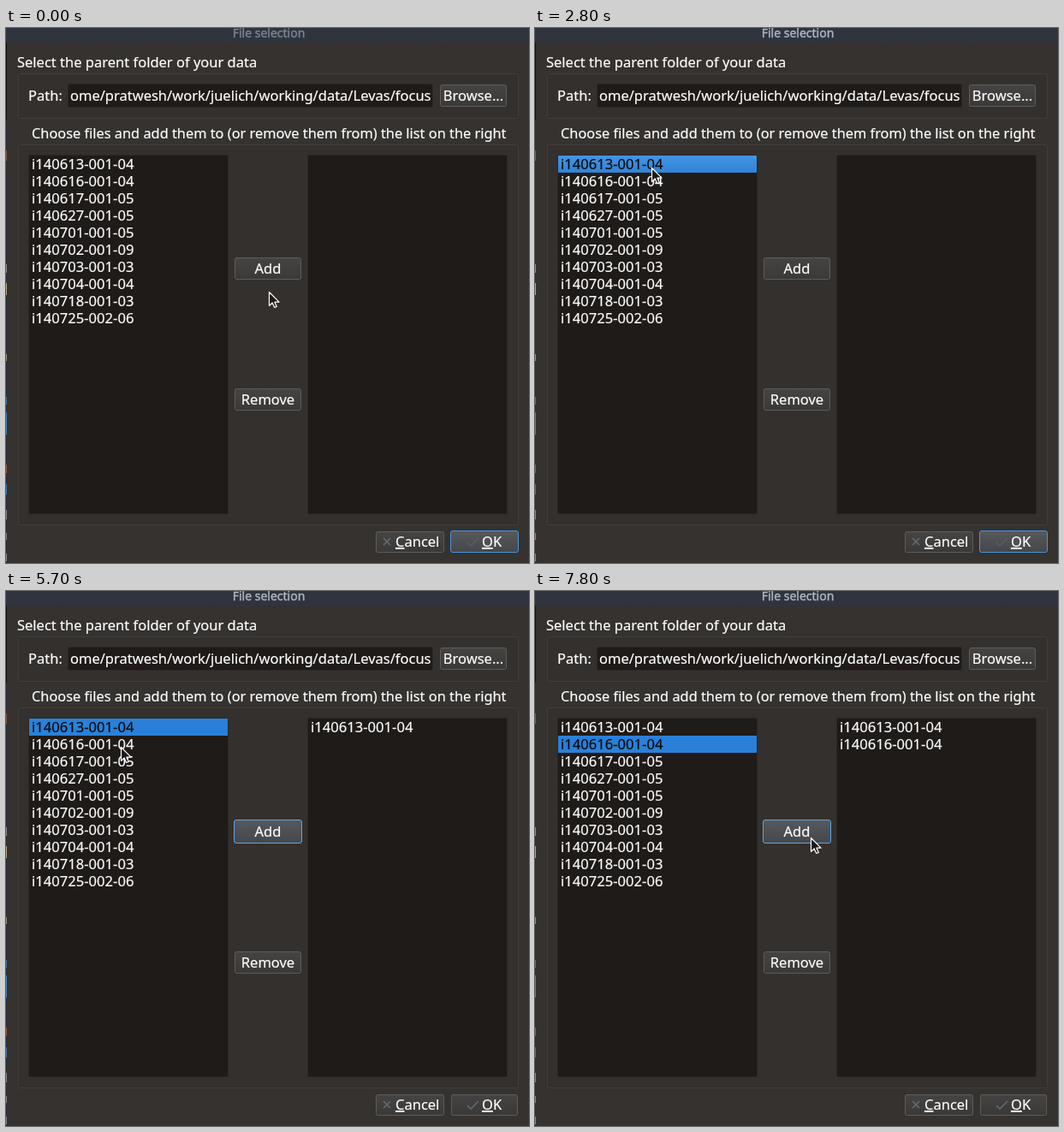
An HTML page for the animation above (8000 ms loop, 611x625 px).

```html
<!DOCTYPE html>
<html lang="en">
<head>
<meta charset="utf-8">
<title>File selection</title>
<style>
  html, body { margin: 0; width: 100%; height: 100%; overflow: hidden; background: #35322f; }
  svg { display: block; width: 100%; height: 100%; }
  text { font: 16.5px "Noto Sans", "Open Sans", sans-serif; fill: #fcfcfc; stroke: #fcfcfc; stroke-width: .2; white-space: pre; }
  .title { font-size: 14px; font-weight: 500; fill: #7d838f; stroke: #7d838f; stroke-width: .4; }
  .title.active { fill: #b0b6c2; stroke: #b0b6c2; }
  .hint { font-size: 16.35px; }
  .row { font-size: 16.6px; }
  .mid { text-anchor: middle; }
  .end { text-anchor: end; }
  .key { text-decoration: underline 1px; text-underline-offset: 2px; text-decoration-skip-ink: none; }
  .group { fill: #34302d; stroke: #403d3a; }
  .field { fill: #1f1b18; stroke: #2a2724; }
  .btn { fill: url(#plain); stroke: #5e5c59; }
  .lit { fill: url(#glow); stroke: #4a94dc; }
  #addLit { stroke: #5ba6ea; }
  .icon { fill: none; stroke: #66707c; stroke-width: 1.3; }
  .picked { fill: #0a0a0a; stroke: #0a0a0a; }
</style>
</head>
<body>
<svg viewBox="0 0 611 625" preserveAspectRatio="none">
  <defs>
    <linearGradient id="bar" x2="0" y2="1">
      <stop offset=".72" stop-color="#2f343f"/>
      <stop offset="1" stop-color="#35322f"/>
    </linearGradient>
    <linearGradient id="plain" x2="0" y2="1">
      <stop stop-color="#464442"/>
      <stop offset="1" stop-color="#3b3937"/>
    </linearGradient>
    <linearGradient id="glow" x2="0" y2="1">
      <stop stop-color="#57595c"/>
      <stop offset="1" stop-color="#44474b"/>
    </linearGradient>
    <linearGradient id="select" x2="0" y2="1">
      <stop stop-color="#4395e3"/>
      <stop offset="1" stop-color="#3182d6"/>
    </linearGradient>
    <clipPath id="pathClip"><rect x="74" y="66" width="424" height="26"/></clipPath>
  </defs>

  <rect width="611" height="625" fill="#35322f"/>
  <rect width="611" height="20" fill="url(#bar)"/>
  <g id="edge">
    <rect y="17" width="1" height="90" fill="#0e0e10"/>
    <rect y="107" width="1" height="518" fill="#2a2f3a"/>
  </g>
  <text class="title mid" id="title" x="307" y="10.5">File selection</text>

  <text x="13" y="46">Select the parent folder of your data</text>
  <rect class="group" x="14.5" y="53.5" width="584" height="52" rx="2"/>
  <text x="26" y="85">Path:</text>
  <rect class="field" x="72.5" y="65.5" width="426" height="27" rx="2"/>
  <g clip-path="url(#pathClip)">
    <text class="end" x="496.5" y="85">ome/pratwesh/work/juelich/working/data/Levas/focus</text>
  </g>
  <rect class="btn" x="507.5" y="66.5" width="77" height="25" rx="2"/>
  <text class="mid" x="546" y="85">Browse...</text>

  <text class="hint" x="30" y="129">Choose files and add them to (or remove them from) the list on the right</text>
  <rect class="group" x="14.5" y="136.5" width="584" height="444" rx="2"/>
  <rect class="field" x="26.5" y="148.5" width="233" height="419" rx="1"/>
  <rect class="field" x="352.5" y="148.5" width="233" height="419" rx="1"/>
  <g id="mark">
    <rect x="27" y="149" width="232" height="20" fill="url(#select)"/>
    <rect id="flat" x="27" y="149" width="232" height="20" fill="#2a80d8"/>
  </g>
  <g id="files"></g>
  <g id="added"></g>

  <rect class="btn" x="267.5" y="268.5" width="77" height="25" rx="2"/>
  <rect class="lit" id="addLit" x="266.5" y="267.5" width="79" height="27" rx="2.5"/>
  <text class="mid" x="306" y="287">Add</text>
  <rect class="btn" x="267.5" y="421.5" width="77" height="25" rx="2"/>
  <text class="mid" x="306" y="440">Remove</text>

  <rect class="btn" x="432.5" y="588.5" width="79" height="24" rx="2"/>
  <path class="icon" d="M441 596l8 8m0-8l-8 8"/>
  <text x="455" y="606"><tspan class="key">C</tspan>ancel</text>
  <rect class="btn" x="520.5" y="588.5" width="77" height="24" rx="2"/>
  <path class="icon" d="M539 601l4 4 9-9"/>
  <g id="okLit">
    <rect class="lit" x="519.5" y="587.5" width="79" height="25" rx="2.5"/>
    <path class="icon" d="M539 601l4 4 9-9" opacity=".5"/>
  </g>
  <text x="556" y="606"><tspan class="key">O</tspan>K</text>

  <path id="cursor" d="M.5 .5V16.5L4.2 13 6.7 18.5 9.3 17.4 6.9 12.2H12Z" fill="#1a1a1a" stroke="#fff" stroke-width="1.2" stroke-linejoin="round"/>
</svg>
<script>
  const LOOP = 8000, STEP = 100;
  const $ = id => document.getElementById(id);
  const names = ["140613-001-04", "140616-001-04", "140617-001-05", "140627-001-05", "140701-001-05",
    "140702-001-09", "140703-001-03", "140704-001-04", "140718-001-03", "140725-002-06"];

  function add(parent, tag, attrs, label = "") {
    const el = document.createElementNS("http://www.w3.org/2000/svg", tag);
    for (const key in attrs) el.setAttribute(key, attrs[key]);
    el.textContent = label;
    return parent.appendChild(el);
  }
  const row = (list, x) => (name, i) => add(list, "text", { x, y: 165 + 20 * i, class: "row" }, "i" + name);
  const files = names.map(row($("files"), 30));
  const added = names.slice(0, 2).map(row($("added"), 356));

  // Slivers of the window behind: y, height, colour
  [[143, 12, "#8a5a3c"], [276, 10, "#8b8d90"], [298, 14, "#b3a679"], [381, 8, "#9c8f72"],
   [431, 9, "#3b77a8"], [449, 26, "#3f83c4"], [510, 10, "#a0583a"], [533, 12, "#3c78b4"],
   [563, 11, "#85888c"], [590, 8, "#85888c"], [614, 9, "#85888c"]]
    .forEach(([y, height, fill]) => add($("edge"), "rect", { y, height, fill, width: 1 }));

  // Pointer moves: start, steps, target x, target y
  const moves = [[1000, 9, 145, 175], [1900, 6, 138, 165], [2800, 1, 136, 163], [3200, 9, 308, 277],
    [5100, 7, 134, 182], [6400, 7, 322, 287], [7200, 1, 322, 286], [7300, 1, 322, 288]];

  function pointer(t) {
    let x = 307, y = 308;
    for (const [start, steps, toX, toY] of moves) {
      if (t < start) break;
      const p = Math.min(1, ((t - start) / STEP + 0.3) / (steps - 0.7));
      const e = p * p * (3 - 2 * p);
      x += (toX - x) * e;
      y += (toY - y) * e;
    }
    return [Math.round(x), Math.round(y)];
  }

  function addFocus(t) {
    if (t >= 7800) return 1;
    if (t < 4600 || t >= 6100) return 0;
    return t < 4700 ? 0.6 : 1;
  }

  const show = (el, on) => el.setAttribute("visibility", on ? "visible" : "hidden");

  function draw(now) {
    const t = Math.floor((now % LOOP) / STEP) * STEP;
    const focus = addFocus(t);
    const picked = t < 2800 ? -1 : t < 6100 ? 0 : 1;

    $("title").classList.toggle("active", picked >= 0);
    show($("mark"), picked >= 0);
    $("mark").setAttribute("transform", `translate(0 ${20 * Math.max(0, picked)})`);
    files.forEach((el, i) => el.classList.toggle("picked", i === picked));
    show(added[0], t >= 4600);
    show(added[1], t >= 7800);
    $("flat").setAttribute("opacity", focus);
    $("addLit").setAttribute("opacity", focus);
    $("okLit").setAttribute("opacity", 1 - focus);
    $("cursor").setAttribute("transform", `translate(${pointer(t)})`);
  }

  function tick() {
    draw(performance.now());
    requestAnimationFrame(tick);
  }
  tick();
</script>
</body>
</html>
```
